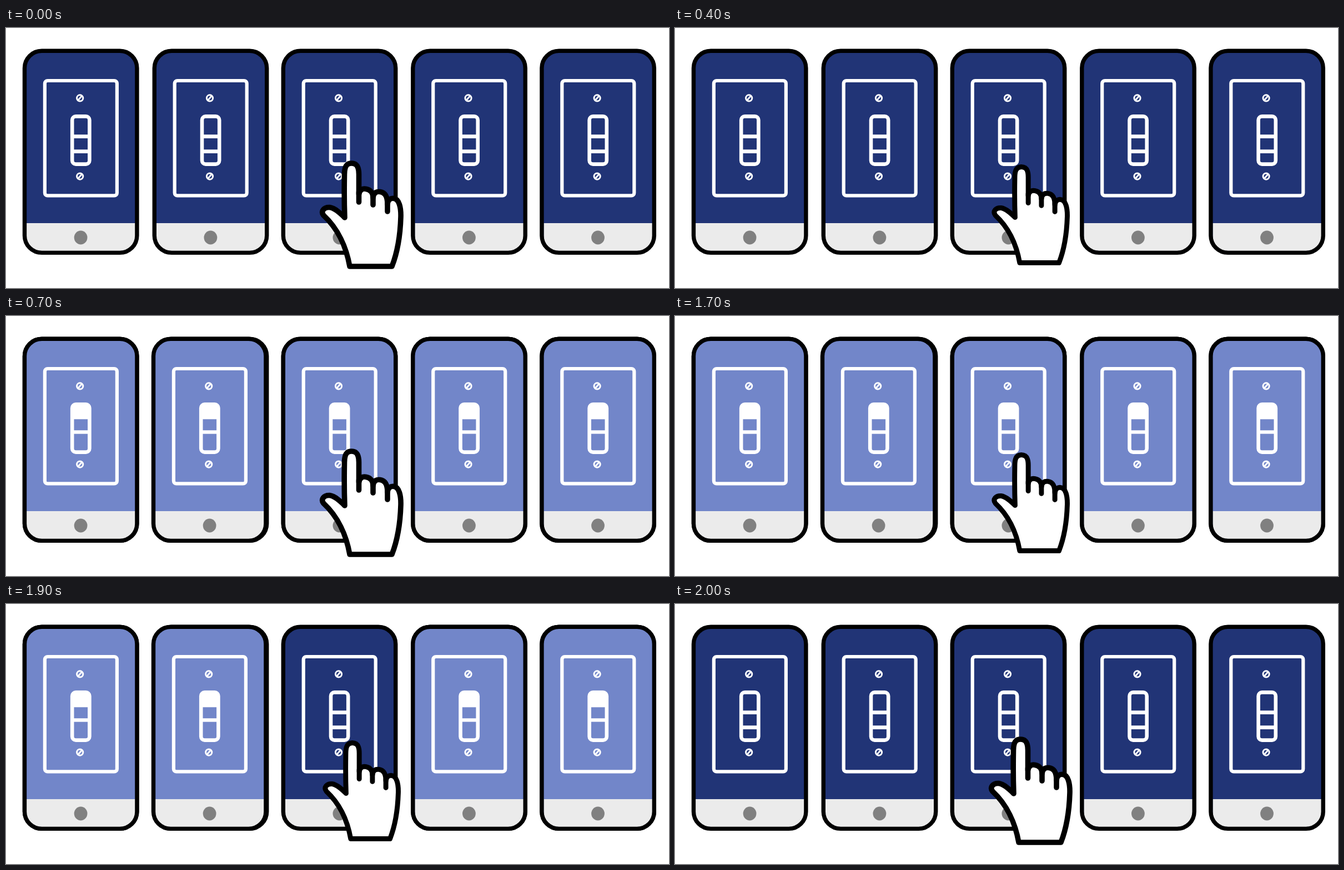
Recreate the animation shown at these times as an HTML page. Size 1194 by 469 pixels, loop 3000 ms.

```html
<!DOCTYPE html>
<html lang="en">
<head>
<meta charset="utf-8">
<title>Light switches</title>
<style>
  html, body { margin: 0; width: 100%; height: 100%; overflow: hidden; background: #fff; }
  svg { display: block; width: 100%; height: 100%; }
</style>
</head>
<body>
<svg viewBox="0 0 1194 469">
  <defs>
    <g id="frame">
      <path d="M37 352H233V379Q233 402 205 402H65Q37 402 37 379Z" fill="#ebebeb"/>
      <ellipse cx="134.6" cy="378" rx="11.9" ry="12.4" fill="#808080"/>
      <rect x="33.5" y="41.2" width="202.4" height="364.2" rx="31" fill="none" stroke="#000" stroke-width="7.4"/>
      <g fill="none" stroke="#fff" stroke-width="6.2">
        <rect x="69.9" y="95" width="130" height="207.4" rx="5"/>
        <rect x="119.2" y="159.4" width="31.2" height="86.2" rx="6.5" stroke-width="6.6"/>
      </g>
      <g id="screw" fill="none" stroke="#fff" stroke-width="3">
        <circle cx="133.2" cy="126.4" r="5.6"/>
        <path d="M129.8 130.2L136.6 122.6"/>
      </g>
      <use href="#screw" y="141.2"/>
    </g>
    <g id="off">
      <rect x="34" y="42" width="201" height="363" rx="31" fill="#213476"/>
      <use href="#frame"/>
      <path d="M119 195.6H151M119 222.6H151" stroke="#fff" stroke-width="6.6"/>
    </g>
    <g id="on">
      <rect x="34" y="42" width="201" height="363" rx="31" fill="#7286c9"/>
      <use href="#frame"/>
      <path d="M119 160H151V186.2H119Z" fill="#fff"/>
      <path d="M119 209.4H151" stroke="#fff" stroke-width="6.4"/>
    </g>
  </defs>
  <g id="phones"></g>
  <g id="hand" fill="#fff" stroke="#000" stroke-width="9.6" stroke-linejoin="round" stroke-linecap="round">
    <path d="M619 430C613 396 598 362 572 338C566 330 573 323 583 323.6C593 325 603 335 610 342
      C609 315 609 290 609.5 264C609.5 251 613 244 622 244C632 244 635.5 251 635.5 264V300
      C637 291 643 289 649 290.5C657 292 661 298 661 306C662 297 667 294.5 674 295.5C683 297 687 304 687 318
      C688 309 693 306.5 699 307.5C708 309 711.5 324 711 341C710 374 706 402 695 430Z"/>
    <path d="M635.5 296V314M661 304V319M687 314V331" fill="none"/>
  </g>
</svg>
<script>
const LOOP = 3000, MIDDLE = 2;
const offX = [0, 233.8, 465.8, 699.3, 931.4];
const onX = [0, 232, 465.8, 699.3, 931.4];
const phones = document.getElementById('phones');
const hand = document.getElementById('hand');

function addPhone(kind, x) {
  const use = document.createElementNS('http://www.w3.org/2000/svg', 'use');
  use.setAttribute('href', '#' + kind);
  use.setAttribute('x', x);
  return phones.appendChild(use);
}
offX.forEach(x => addPhone('off', x));
const lit = onX.map(x => addPhone('on', x));

// Hand scale in the three 100 ms steps after a press starts
function handScale(t) {
  const on = t < 1700;
  const step = Math.floor((t - (on ? 400 : 1700)) / 100);
  return (on ? [0.931, 0.87, 0.94] : [0.931, 0.87, 0.931])[step] || 1;
}

function draw(t) {
  lit.forEach((phone, i) => {
    const on = i === MIDDLE ? t >= 500 && t < 1800 : t >= 700 && t < 2000;
    phone.style.display = on ? '' : 'none';
  });
  hand.setAttribute('transform', `translate(645 337) scale(${handScale(t)}) translate(-645 -337)`);
}

const start = performance.now();
function tick() {
  draw((performance.now() - start) % LOOP);
  requestAnimationFrame(tick);
}
draw(0);
requestAnimationFrame(tick);
</script>
</body>
</html>
```
